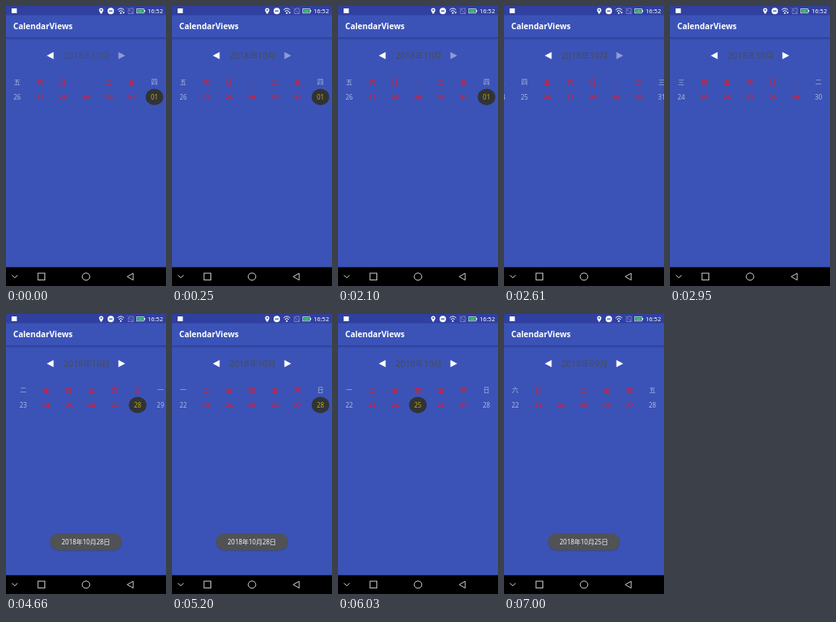
An HTML page for the animation above (8 s loop, 200 px wide and 350 px high).

```html
<!DOCTYPE html>
<html lang="zh">
<head>
<meta charset="utf-8">
<title>CalendarViews</title>
<style>
  html, body { margin: 0; width: 100%; height: 100%; overflow: hidden; background: #3b53b7; }
  svg { display: block; width: 100%; height: 100%; }
  text { font-family: 'Noto Sans', 'Noto Sans CJK SC', 'Noto Sans CJK JP', sans-serif; }
  .day { font-size: 8px; text-anchor: middle; fill: #b0b8df; }
  .inner { fill: #d5203a; font-weight: 700; }
  .picked { fill: #b5ad1c; font-weight: 400; }
  .line { fill: none; stroke: #d0d0d0; stroke-width: 1; }
</style>
</head>
<body>
<svg viewBox="0 0 200 350">
  <defs>
    <linearGradient id="shade" x2="0" y2="1">
      <stop stop-color="#22347f" stop-opacity=".6"/>
      <stop offset="1" stop-color="#22347f" stop-opacity="0"/>
    </linearGradient>
  </defs>
  <rect width="200" height="350" fill="#3b53b7"/>
  <rect width="200" height="11.5" fill="#3040a0"/>
  <rect y="39" width="200" height="4" fill="url(#shade)"/>

  <!-- status bar -->
  <g fill="#fff">
    <rect x="7" y="3" width="6.5" height="6"/>
    <path fill-rule="evenodd" d="M119 10.2C117.5 8 116.4 6.7 116.4 5a2.6 2.6 0 0 1 5.2 0C121.6 6.7 120.5 8 119 10.2ZM118 5a1 1 0 0 0 2 0a1 1 0 0 0-2 0Z"/>
    <circle cx="131" cy="6.2" r="4"/>
    <path d="M128.8 5.6h4.4v1.2h-4.4z" fill="#3040a0"/>
    <g fill="none" stroke="#fff" stroke-width="1">
      <path d="M139.5 4.8q4-3.6 8 0M141 6.7q2.5-2.2 5 0"/>
    </g>
    <circle cx="143.5" cy="8.8" r="1.1"/>
    <path id="traffic" d="M145.5 7.5h3l-1.5 2.2z"/>
    <path d="M153 9.5v-4.5l2-2h4v6.5zM152 2.5l7 7" fill="none" stroke="#8690cc" stroke-width=".8"/>
    <rect x="163.5" y="3.6" width="8.8" height="5.2" fill="none" stroke="#dce4e8" stroke-width=".8"/>
    <rect x="164.6" y="4.6" width="6.6" height="3.2" fill="#35c56a"/>
    <rect x="172.6" y="5" width="1.2" height="2.4"/>
    <text x="177" y="9" font-size="7.5">16:52</text>
    <text x="9" y="29.2" font-size="10.1" font-weight="700">CalendarViews</text>
  </g>

  <!-- month header -->
  <text id="month" x="101" y="65.8" font-size="10.7" text-anchor="middle" fill="#474c5a"></text>
  <path d="M51 62l8.5-4.5v9z" fill="#fff"/>
  <path id="next" d="M149 62l-8.5-4.5v9z" fill="#fff"/>

  <g id="days"></g>

  <g id="toast">
    <rect x="55" y="275" width="90" height="21.5" rx="10.7" fill="#1c2860" opacity=".25"/>
    <rect x="55" y="274" width="90" height="21.5" rx="10.7" fill="#505256"/>
    <text id="message" x="99.8" y="287.8" font-size="8" text-anchor="middle" fill="#f4f4f4"></text>
  </g>

  <!-- navigation bar -->
  <rect y="326.5" width="200" height="23.5"/>
  <g class="line">
    <path d="M7.5 336.5l3.5 3.2 3.5-3.2"/>
    <rect x="40" y="334" width="8.6" height="8.4"/>
    <ellipse cx="100" cy="338.3" rx="4.8" ry="4.5"/>
    <path d="M151.5 338.3l7.5-4.3v8.6z"/>
  </g>
</svg>
<script>
const LOOP = 8000, GAP = 28.6, LEFT = 14;
const WEEK = '日一二三四五六';
const $ = id => document.getElementById(id);

function make(tag, attrs, parent) {
  const el = document.createElementNS('http://www.w3.org/2000/svg', tag);
  for (const key in attrs) el.setAttribute(key, attrs[key]);
  return parent.appendChild(el);
}

const cells = Array.from({ length: 8 }, () => {
  const group = make('g', {}, $('days'));
  return {
    group,
    disc: make('ellipse', { cy: 113.8, rx: 11, ry: 10.2, fill: '#323334' }, group),
    week: make('text', { y: 97.8 }, group),
    date: make('text', { y: 116.8 }, group)
  };
});

// [time, day in the first column], counted from 1 October
const SCROLL = [
  [0, 26], [2100, 26], [2240, 25.72], [2420, 25.18], [2610, 24.6], [2760, 24.22],
  [2890, 24.04], [2950, 24], [4420, 24], [4540, 23.4], [4660, 22.74],
  [4780, 22.3], [4920, 22.04], [5180, 22.04], [5200, 22], [LOOP, 22]
];
// [time, fade of the toast]
const FADE = [[0, 0], [3480, 0], [3800, 1], [5730, 1], [6010, 0], [6030, 0], [6330, 1], [LOOP, 1]];

function track(steps, t) {
  const i = steps.findIndex(step => step[0] > t);
  const [t0, a] = steps[i - 1], [t1, b] = steps[i];
  return a + (b - a) * (t - t0) / (t1 - t0);
}

function dayOfMonth(day) {
  const n = day < 1 ? day + 30 : day > 31 ? day - 31 : day;
  return String(n).padStart(2, '0');
}

function drawDays(first, selected) {
  const base = Math.floor(first);
  cells.forEach((cell, i) => {
    const day = base + i, x = LEFT + (day - first) * GAP;
    const tone = x > 28.6 && x < 171.4 ? 'day inner' : 'day';
    const picked = day === selected;
    cell.group.setAttribute('transform', `translate(${x} 0)`);
    cell.disc.style.display = picked ? '' : 'none';
    cell.week.setAttribute('class', tone);
    cell.date.setAttribute('class', picked ? 'day picked' : tone);
    cell.week.textContent = WEEK[(day % 7 + 7) % 7];
    cell.date.textContent = dayOfMonth(day);
  });
}

function draw(t) {
  const september = t >= 7000;
  const selected = t < 3480 ? 32 : t < 5950 ? 28 : 25;
  drawDays(september ? -8 : track(SCROLL, t), selected);
  $('month').textContent = september ? '2018年09月' : '2018年10月';
  $('month').style.opacity = t < 250 ? .75 : 1;
  $('next').style.opacity = t < 2910 ? .42 : 1;
  $('traffic').style.opacity = t < 3340 ? 1 : 0;
  $('message').textContent = `2018年10月${t < 6020 ? 28 : 25}日`;
  $('toast').style.opacity = track(FADE, t);
}

const start = performance.now();
function tick() {
  draw((performance.now() - start) % LOOP);
  requestAnimationFrame(tick);
}
tick();
</script>
</body>
</html>
```
